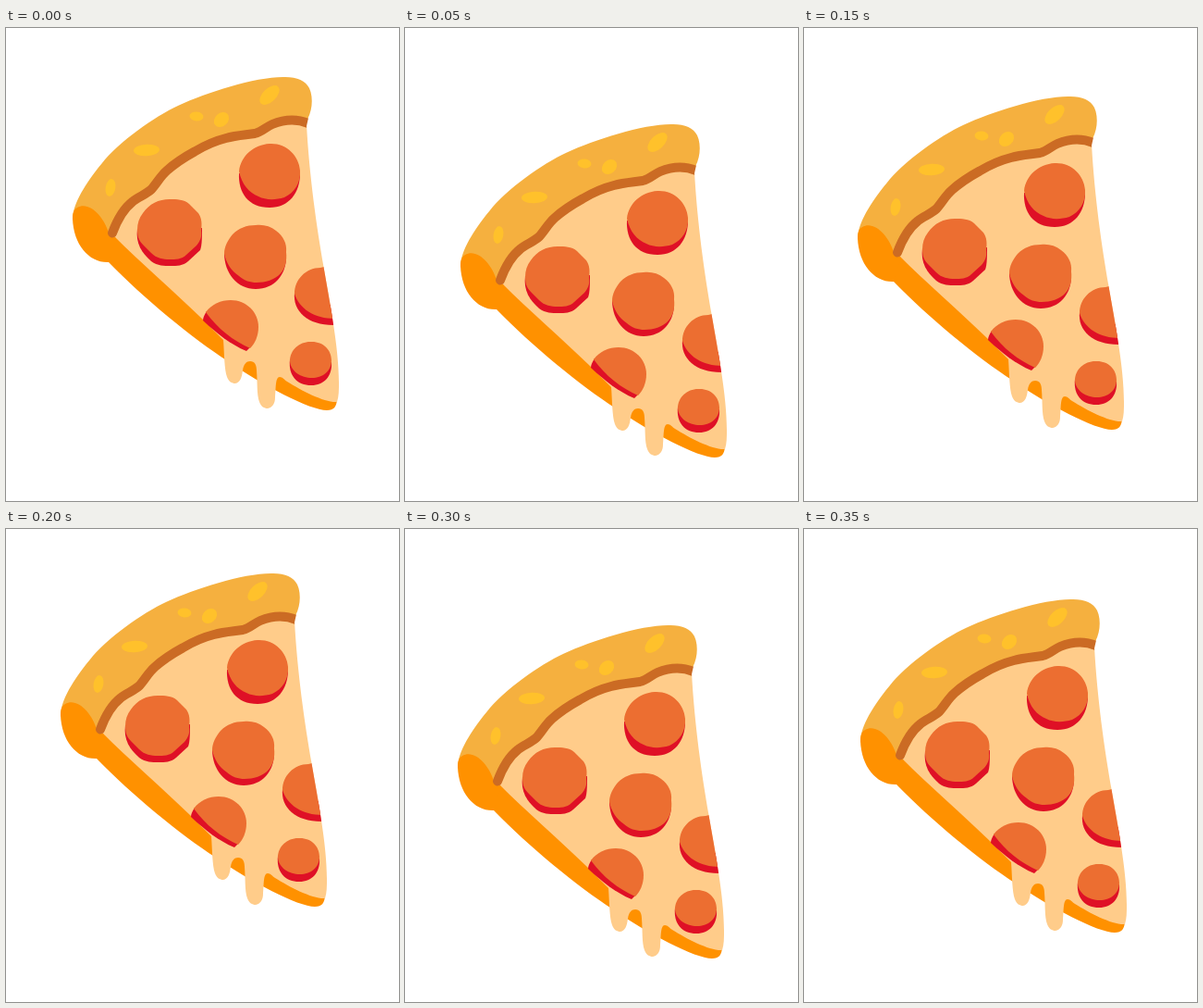
Animation, 425 px wide and 511 px high, one loop 400 ms. Source, as an HTML page:

```html
<!DOCTYPE html>
<html lang="en">
<head>
<meta charset="utf-8">
<title>Bouncing pizza</title>
<style>
  html, body { margin: 0; width: 100%; height: 100%; overflow: hidden; background: #fff; }
  svg { display: block; width: 100%; height: 100%; }
  .base { fill: #ff9100; }
  .cheese { fill: #ffcc8a; }
  .crust { fill: #f5b03f; }
  .seed { fill: #ffc12b; }
  .edge { fill: none; stroke: #cb6b24; stroke-width: 10; stroke-linecap: round; }
  .side { fill: #df1026; }
  .top { fill: #ec6e31; }
</style>
</head>
<body>
<svg viewBox="0 0 425 511">
  <defs>
    <clipPath id="slice">
      <path d="M60 40H340L325 106C328 160 336 215 343.500 258C350 296 360 345 360 385L358 420H60Z"/>
    </clipPath>
  </defs>
  <g id="pizza">
    <path class="base" d="M100 215L111 253C150 293 200 334 240 360C277 386 329 413 347 413C355 413 357 409 358 402L325 370L118 224Z"/>
    <path class="cheese" d="M117 225C146 254 181 284 213 315L235 337C236 350 236 369 239 377C241 382 244 384 248 384C253 383 255 378 256 370C257 363 260 360 264 360C269 360 271 364 271 370C272 382 271 396 274 404C276 409 279 411 283 411C288 410 291 406 291 399C292 390 291 377 296 377C299 377 301 380 304 382C320 392 345 405 358 404C360 398 360 391 360 383C360 345 350 296 343.500 258C336 215 328 160 325 104C300 92 285 110 270 115C225 120 180 145 158 176C140 187 125 199 117 225Z"/>
    <path class="crust" d="M324 102C331 92 333 76 328 65C324 57 315 53 302 53C272 52 217 69.500 187 83.500C160 96 122 123 103.500 146.500C86.500 167 72 190 72 207L90 225L114 224L124 201L137 187.500L157 174.500L174 154L204 133.500L238 119L269 114L288 104L307 99Z"/>
    <path class="base" d="M72 206C73 234 90 254 111 253L119 227L112 224C106 203 90 187 77 194C73 196 72 201 72 206Z"/>
    <path class="edge" clip-path="url(#slice)" d="M115 221.500C120 208 126 196 137 187.500C143 182.500 151 180 157 174.500C163 168 167 160 174 154C183 146 193 139.500 204 133.500C214 127.500 226 122 238 119C249 116 260 115.500 269 114C277 112 281 107 288 104C299 99.500 312 97 327 103"/>
    <g class="seed">
      <ellipse rx="14" ry="6.300" transform="translate(152 132) rotate(-3)"/>
      <ellipse rx="5.300" ry="9.500" transform="translate(113 172.500) rotate(10)"/>
      <ellipse rx="7.500" ry="5" transform="translate(206 95.500) rotate(5)"/>
      <ellipse rx="9" ry="7" transform="translate(233 99) rotate(-42)"/>
      <ellipse rx="13" ry="7.200" transform="translate(285 72.500) rotate(-44)"/>
    </g>
    <g clip-path="url(#slice)">
      <path class="side" d="M142 217C140 233 147 243 157 252C164 257 171 257 178 257C185 257 191 257 197 252L210 240C212 234 212 226 212 216Z"/>
      <path class="top" d="M177 185C185 185 192 185 198 190L208 200C212 206 212 212 211 219C212 226 210 230 206 235L195 245C190 250 183 250 177 250C170 250 163 249 157 243L148 234C143 229 142 224 142 218C142 211 144 205 148 200C155 190 165 185 177 185Z"/>

      <path class="side" d="M252 157C251 178 262 194 285 194C306 194 318 178 318 157Z"/>
      <path class="top" d="M285 125C303 124 317 138 318 154C319 167 312 178 301 183C291 186 281 186 273 182C263 178 255 169 252 155C254 138 268 126 285 125Z"/>

      <path class="side" d="M236 243C236 265 250 282 270 282C290 282 303 267 303 247Z"/>
      <path class="top" d="M270 213C278 212 286 214 292 219C300 225 304 233 303 242C304 252 302 259 297 265C291 272 280 275 271 275C264 275 258 273 252 268C243 262 238 253 236 244C236 236 240 229 245 223C252 216 260 213 270 213Z"/>

      <path class="side" d="M312 286C310 306 326 321 354 321V300Z"/>
      <path class="top" d="M340 259C324 259 312 272 312 287C317 303 333 314 356 314L344 258Z"/>

      <path class="side" d="M217 306C215 309 213 313 213 316C228 330 243 342 260 349L265 344L245 325Z"/>
      <path class="top" d="M216 307C223 298 232 294 243 294C260 294 273 307 273 323C273 333 269 341 264 346C246 338 229 325 216 307Z"/>

      <path class="side" d="M307 358C305 376 315 386 330 386C344 386 353 376 352 361Z"/>
      <path class="top" d="M329 339C342 338 352 347 352 359C352 371 342 378 331 378C319 378 308 371 307 360C307 348 317 339 329 339Z"/>
    </g>
  </g>
</svg>
<script>
  const STEP = 50;
  // Offset of the slice at each beat of the bounce.
  const beats = [[0, 0], [-12, 51], [-13, 38], [-14, 21], [-13, -5], [-12, 16.5], [-15, 51], [-11, 23]];
  const pizza = document.getElementById('pizza');
  const start = performance.now();

  function draw(ms) {
    const [x, y] = beats[Math.floor(ms / STEP) % beats.length];
    pizza.setAttribute('transform', `translate(${x} ${y})`);
  }

  function tick() {
    draw(performance.now() - start);
    requestAnimationFrame(tick);
  }
  tick();
</script>
</body>
</html>
```
